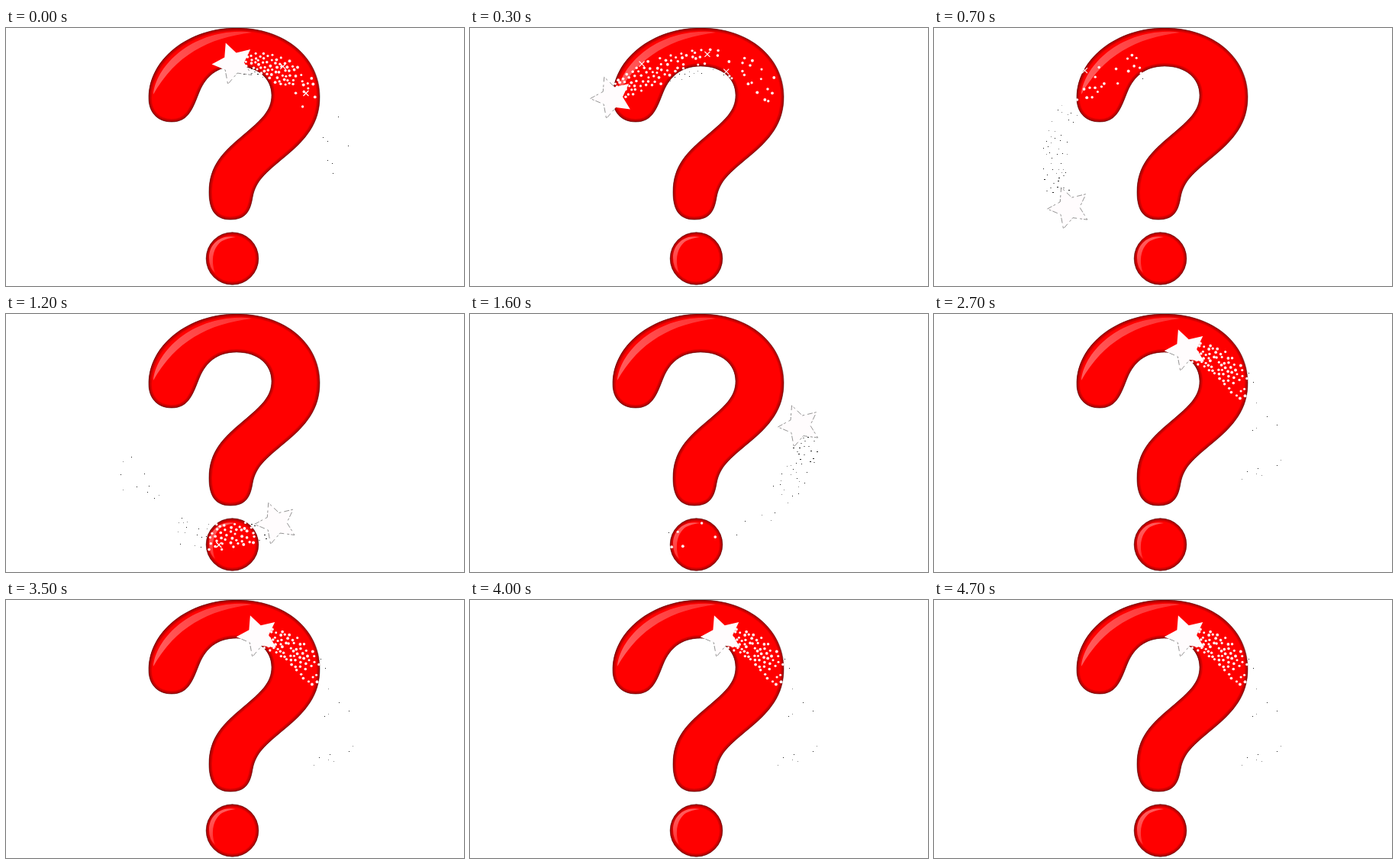
An HTML page with a canvas that plays this animation: 600 by 338 pixels, repeating every 5000 ms.

```html
<!DOCTYPE html>
<html lang="en">
<head>
<meta charset="utf-8">
<title>Question mark</title>
<style>
html, body { margin: 0; width: 100%; height: 100%; overflow: hidden; background: #fff; }
canvas { display: block; width: 600px; height: 338px; }
</style>
</head>
<body>
<canvas id="stage" width="600" height="338"></canvas>
<script>
const W = 600, H = 338, LOOP = 5000, STEP = 100, LAST = 20, PACE = 38;
const ctx = document.getElementById('stage').getContext('2d');

// Corners of the star's closed path, evenly spaced in time.
const corners = [[298, 46], [186, 91], [160, 202], [238, 286], [354, 274], [438, 185], [385, 74]];
const STEPS_PER_CORNER = 3;

const hook = new Path2D('M187 92C187 40 240 0 302 0C365 0 411 38 411 90' +
  'C411 125 393 146 365 169C340 190 327 200 323 222C320 240 314 251 294 251' +
  'C274 251 266 238 266 215C266 180 285 162 310 141C335 120 348 108 348 88' +
  'C348 66 330 50 302 50C276 50 262 64 254 82C245 104 240 123 217 123C198 123 187 110 187 92Z');
const dot = new Path2D();
dot.arc(296.5, 302, 34.3, 0, Math.PI * 2);
const mark = new Path2D(hook);
mark.addPath(dot);
const outside = new Path2D();
outside.rect(0, 0, W, H);
outside.addPath(mark);

const hookShine = new Path2D('M193 87C196 52 238 8 300 5Q314 4 322 6C264 13 222 36 193 87Z');
const dotShine = new Path2D('M301 274C280 270 266 284 266 301Q266 314 274 321C268 305 271 287 283 279Q291 275 301 274Z');

function random(seed) {
  let a = seed * 7919 + 17;
  return () => {
    a = (a + 0x6D2B79F5) | 0;
    let t = Math.imul(a ^ (a >>> 15), 1 | a);
    t = (t + Math.imul(t ^ (t >>> 7), 61 | t)) ^ t;
    return ((t ^ (t >>> 14)) >>> 0) / 4294967296;
  };
}

// Point of the closed Catmull-Rom curve at step k.
function at(k) {
  const n = corners.length, i = Math.floor(k / STEPS_PER_CORNER), t = k / STEPS_PER_CORNER - i;
  const [a, b, c, d] = [-1, 0, 1, 2].map(j => corners[(((i + j) % n) + n) % n]);
  return [0, 1].map(m => b[m] + 0.5 * t * (c[m] - a[m] +
    t * (2 * a[m] - 5 * b[m] + 4 * c[m] - d[m] + t * (3 * (b[m] - c[m]) + d[m] - a[m]))));
}

// Point behind the star: lag along the path, off to its side.
function behind(k, lag, off) {
  const back = k - lag / PACE;
  const [x, y] = at(back), [px, py] = at(back - 0.1), [qx, qy] = at(back + 0.1);
  const len = Math.hypot(qx - px, qy - py);
  return [x + off * (py - qy) / len, y + off * (qx - px) / len];
}

function gradient(x0, y0, x1, y1, from, to) {
  const g = ctx.createLinearGradient(x0, y0, x1, y1);
  g.addColorStop(0, from);
  g.addColorStop(1, to);
  return g;
}

function drawMark() {
  ctx.fillStyle = '#f00';
  ctx.fill(mark);
  ctx.save();
  ctx.clip(mark);
  ctx.strokeStyle = 'rgba(90,0,0,.16)';
  for (const w of [8, 6, 4, 2]) {
    ctx.lineWidth = w;
    ctx.stroke(mark);
  }
  ctx.restore();
  ctx.strokeStyle = 'rgba(60,0,0,.65)';
  ctx.lineWidth = 0.8;
  ctx.stroke(mark);
  ctx.fillStyle = gradient(205, 60, 315, 6, '#ff5a5a', '#ff3030');
  ctx.fill(hookShine);
  ctx.fillStyle = gradient(266, 280, 290, 318, '#ff6464', '#f22');
  ctx.fill(dotShine);
}

function drawDust(k, rnd) {
  for (let lag = 14, row = 0; lag < 255; lag += 6.2, row++) {
    const keep = lag < 95 ? 0.95 : lag < 130 ? 0.5 : 0.2;
    const gap = 5.5 + Math.min(lag, 80) / 45;
    for (let j = -2; j <= 2; j++) {
      const off = (j + (row % 2 ? 0.25 : -0.25)) * gap + (rnd() - 0.5) * 3;
      const slip = (rnd() - 0.5) * 3, chance = rnd(), size = rnd();
      if (chance > keep) continue;
      const [x, y] = behind(k, lag + slip, off);
      if (ctx.isPointInPath(mark, x, y)) {
        ctx.fillStyle = '#fff0f0';
        ctx.beginPath();
        ctx.arc(x, y, 1.5 + size * 0.5, 0, Math.PI * 2);
        ctx.fill();
      } else if (size < 0.65) {
        ctx.fillStyle = size < 0.35 ? '#222' : '#888';
        ctx.fillRect(Math.round(x), Math.round(y), lag < 50 ? 2 : 1, 1);
      }
    }
  }
}

function drawSparkles(k, rnd) {
  ctx.strokeStyle = '#fff';
  ctx.lineWidth = 1.2;
  for (let i = 0; i < 3; i++) {
    const [x, y] = behind(k, 50 + i * 55 + rnd() * 30, (rnd() - 0.5) * 44);
    ctx.beginPath();
    for (const side of [-1, 1]) {
      ctx.moveTo(x - 3.5, y - 3.5 * side);
      ctx.lineTo(x + 3.5, y + 3.5 * side);
    }
    ctx.stroke();
  }
}

function drawStar(k) {
  const [x, y] = at(k), star = new Path2D();
  for (let i = 0; i < 10; i++) {
    const a = (177 + i * 36) * Math.PI / 180, r = i % 2 ? 14 : 28.5;
    star.lineTo(x + r * Math.cos(a), y + r * Math.sin(a));
  }
  star.closePath();
  ctx.fillStyle = '#fffcfd';
  ctx.fill(star);
  // Against the white ground only a broken outline shows.
  ctx.save();
  ctx.clip(outside, 'evenodd');
  ctx.setLineDash([7, 2, 3, 4]);
  ctx.lineWidth = 0.7;
  ctx.strokeStyle = '#666';
  ctx.stroke(star);
  ctx.restore();
}

function draw(k) {
  const rnd = random(k + 1);
  ctx.fillStyle = '#fff';
  ctx.fillRect(0, 0, W, H);
  drawMark();
  drawDust(k, rnd);
  if (k < LAST) drawSparkles(k, rnd);
  drawStar(k);
}

const start = performance.now();
let shown = -1;

// The star moves in steps, then rests until the loop ends.
function tick() {
  const t = (performance.now() - start) % LOOP;
  const k = Math.min(LAST, Math.floor(t / STEP));
  if (k !== shown) draw(shown = k);
  requestAnimationFrame(tick);
}
tick();
</script>
</body>
</html>
```
